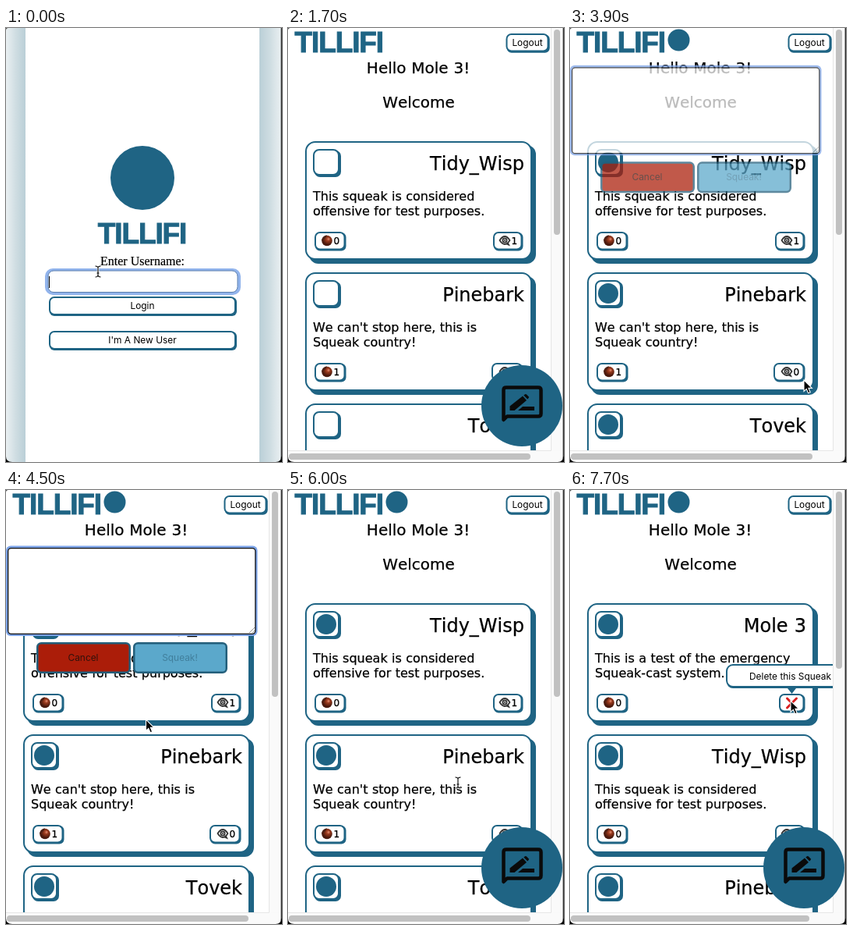
These frames come from a looping animation (354x556 px, 8000 ms). An HTML page:

```html
<!DOCTYPE html>
<html lang="en">
<head>
<meta charset="utf-8">
<title>Tillifi</title>
<style>
  html, body { margin: 0; width: 100%; height: 100%; overflow: hidden; background: #fff; }
  svg { display: block; width: 354px; height: 556px; }
  text { white-space: pre; }
  .ui { font: 11.9px Inter, sans-serif; }
  .page { font-family: "DejaVu Sans", sans-serif; font-kerning: none; word-spacing: .02em;
          stroke: #000; stroke-width: .25px; }
  .serif { font: 16px "Liberation Serif", serif; stroke: #000; stroke-width: .2px; }
  .brand { font: bold 37px "Liberation Sans", sans-serif; letter-spacing: -1.1px;
           fill: #1f6484; stroke: #1f6484; stroke-width: 1px; }
</style>
</head>
<body>
<svg id="stage" viewBox="0 0 354 556">
  <defs>
    <linearGradient id="left"><stop offset="0" stop-color="#eaf0f2"/><stop offset=".5" stop-color="#cfdde2"/><stop offset="1" stop-color="#bacfd7"/></linearGradient>
    <linearGradient id="right"><stop offset="0" stop-color="#bacfd7"/><stop offset=".5" stop-color="#cfdde2"/><stop offset="1" stop-color="#eaf0f2"/></linearGradient>
    <radialGradient id="shell" cx=".6" cy=".35"><stop offset="0" stop-color="#c05a3c"/><stop offset=".5" stop-color="#8a3218"/><stop offset="1" stop-color="#4a1a0e"/></radialGradient>
  </defs>
  <g id="scene"></g>
</svg>
<script>
const LOOP = 8000, STEP = 100;
const TEAL = '#1f6484';
const USER = 'Mole 3';
const MESSAGE = 'This is a test of the emergency Squeak-cast system.';
const WRAP = 48;
const scene = document.getElementById('scene');

const text = (x, y, str, { cls = 'page', size, anchor = 'start', fill = '#000', id = '' } = {}) =>
  `<text x="${x}" y="${y}" class="${cls}" text-anchor="${anchor}"` +
  `${cls === 'brand' ? '' : ` fill="${fill}"`}${size ? ` font-size="${size}"` : ''}${id ? ` id="${id}"` : ''}>${str}</text>`;

const rect = (x, y, w, h, r, fill, stroke = 'none', sw = 0) =>
  `<rect x="${x + sw / 2}" y="${y + sw / 2}" width="${w - sw}" height="${h - sw}" rx="${r}" fill="${fill}" stroke="${stroke}" stroke-width="${sw}"/>`;

const circle = (x, y, r, fill, stroke = 'none', sw = 0) =>
  `<circle cx="${x}" cy="${y}" r="${r}" fill="${fill}" stroke="${stroke}" stroke-width="${sw}"/>`;

const path = (d, fill, stroke = 'none', sw = 0, extra = '') =>
  `<path d="${d}" fill="${fill}" stroke="${stroke}" stroke-width="${sw}" ${extra}/>`;

const at = (x, y, body, extra = '') => `<g transform="translate(${x} ${y})" ${extra}>${body}</g>`;

// White box with a teal border and a hard shadow to the lower right.
const raised = (x, y, w, h, r, drop) =>
  rect(x + drop, y + drop, w, h, r, TEAL) + rect(x, y, w, h, r, '#fff', TEAL, 2);

// ---------- login ----------
function login(t) {
  const typed = USER.slice(0, [100, 300, 500, 700, 900, 1200].filter(k => t >= k).length);
  return rect(0, 0, 354, 556, 0, '#fff') +
    rect(0, 0, 25, 556, 0, 'url(#left)') + rect(325, 0, 28, 556, 0, 'url(#right)') +
    circle(175, 192, 41, TEAL) +
    text(174.5, 275.5, 'TILLIFI', { cls: 'brand', anchor: 'middle' }) +
    text(175, 304, 'Enter Username:', { cls: 'serif', anchor: 'middle' }) +
    rect(50, 308, 251, 34, 10, '#92b4ec') +
    rect(53.5, 310.5, 244, 28.5, 7, '#fff', '#5b7fae', 1) +
    text(55, 330, typed, { cls: 'ui', id: 'typed' }) +
    `<rect id="caret" x="55" y="318" width="1" height="15"/>` +
    raised(55, 344, 240, 24, 6, 1) + text(175, 360, 'Login', { cls: 'ui', anchor: 'middle' }) +
    raised(55, 388, 240, 24, 6, 1) + text(175, 404, "I'm A New User", { cls: 'ui', anchor: 'middle' });
}

// ---------- feed ----------
const nut = (x, y) => at(x, y,
  circle(0, 0, 6.8, 'url(#shell)') +
  path('M-7 0C-6-5-3-7 0-7C-1-4-4-1-7 0Z', '#4d2015') + circle(2, -2, 1.4, '#d0775a'));

const eye = (x, y) => at(x, y,
  path('M1 4.5L7 7L4.5 2Z', '#333') +
  path('M-6.5-.5Q0-10.5 6.5-.5Q0 9.5-6.5-.5Z', '#fff', '#333', 1.8, 'stroke-linejoin="round"') +
  circle(0, -.5, 2.6, '#fff', '#333', 1.8) + circle(0, -.5, 1, '#333'));

const cross = (x, y) => at(x, y,
  path('M-6-6L6 6M6-6L-6 6', 'none', '#d81e1e', 3, 'stroke-linecap="round"'));

function card(y, { name, lines, nuts, views }, icons) {
  const own = views === undefined;
  const left = own ? 268 : views ? 263 : 261;
  return at(0, y,
    raised(22, -1, 291, 152, 12, 5) +
    raised(32, 9, 34, 34, 7, 2) + (icons ? circle(49, 26, 13, TEAL) : '') +
    text(303, 36, name, { size: 24, anchor: 'end' }) +
    lines.map((l, i) => text(32, 75 + 19 * i, l, { size: 16 })).join('') +
    raised(34, 115, 39.5, 23.5, 6, 1) + nut(50, 126.5) + text(58.5, 131, nuts, { size: 12 }) +
    raised(left, 115, 300.5 - left, 23.5, 6, 1) +
    (own ? cross(284.5, 127) : eye(278, 126.5) + text(286.5, 131, views, { size: 12 })));
}

const posts = [
  { name: USER, lines: ['This is a test of the emergency', 'Squeak-cast system.'], nuts: 0 },
  { name: 'Tidy_Wisp', lines: ['This squeak is considered', 'offensive for test purposes.'], nuts: 0, views: 1 },
  { name: 'Pinebark', lines: ["We can't stop here, this is", 'Squeak country!'], nuts: 1, views: 0 },
  { name: 'Tovek', lines: [], nuts: 0, views: 0 },
];

const tooltip = () =>
  path('M279 254H290L284.5 261Z', TEAL) +
  raised(200, 223, 170, 30, 8, 1) +
  text(230, 243, 'Delete this Squeak', { cls: 'ui' });

const scrollbars = posted =>
  rect(337.5, 0, 15.5, 556, 0, '#fafafa') + rect(0, 541.5, 353, 14.5, 0, '#fafafa') +
  path('M337.5 0V541.5M0 541.5H337.5', 'none', '#e6e6e6', 1) +
  rect(341, 2, 8, posted ? 227 : 263, 4, '#c1c1c1') +
  rect(1, 545, posted ? 306 : 310, 8, 4, '#c1c1c1');

const composeButton = () =>
  circle(300, 484, 52, TEAL) +
  path('M276.5 502V463.5Q276.5 460.5 280 460.5H321Q324.5 460.5 324.5 464V494Q324.5 497.5 321 497.5H281Z',
    'none', '#0a0a0a', 4.5, 'stroke-linejoin="round"') +
  path('M284.5 490V484.5L301 471.5L306 477L290.5 490Z', '#0a0a0a') +
  path('M302.3 470.5L304 469.2Q305 468.6 306 469.4L308.6 472.2Q309.4 473.2 308.6 474L307.2 475.4Z', '#0a0a0a') +
  path('M295 490L301 485H316V490Z', '#0a0a0a');

// ---------- composer ----------
function composer(t) {
  const p = Math.min(1, (t - 3800) / 300);
  const lift = -80 * (1 - p) ** 3;
  const count = Math.max(0, Math.min(MESSAGE.length, Math.round((t - 4600) / 700 * MESSAGE.length)));
  const typed = MESSAGE.slice(0, count);
  const button = (x, fill, label, ink) =>
    rect(x, 195, 121, 40, 5, fill, '#245f7b', 2.5) +
    text(x + 60, 219, label, { cls: 'ui', anchor: 'middle', fill: ink });
  return at(0, lift,
    rect(0, 71.5, 322.5, 115.5, 6, '#7ba2e6') +
    rect(2, 74, 318.5, 111, 4, '#fff', '#111', 1.3) +
    path('M312 183L319 176M316 183L319 180', 'none', '#777', .8) +
    text(22, 99, typed.slice(0, WRAP), { cls: 'ui' }) +
    text(22, 114, typed.slice(WRAP), { cls: 'ui' }) +
    button(39, '#ab1d09', 'Cancel', '#32120c') +
    button(163, '#5ba8cb', 'Squeak!', count ? '#12272f' : '#417f9c'),
    `opacity="${Math.min(1, .4 + p)}"`);
}

function feed(t) {
  const icons = t >= 1800, posted = t >= 6200;
  const composing = t >= 3900 && t < 5600;
  return rect(0, 0, 354, 556, 0, '#fff') +
    text(8.5, 30.7, 'TILLIFI', { cls: 'brand' }) + (icons ? circle(139.5, 15.5, 14, TEAL) : '') +
    raised(279.5, 7, 55, 23.5, 6, 1.2) + text(307, 23, 'Logout', { cls: 'ui', anchor: 'middle' }) +
    text(167, 58, `Hello ${USER}!`, { size: 20, anchor: 'middle' }) +
    text(167.5, 102, 'Welcome', { size: 20, anchor: 'middle' }) +
    posts.slice(posted ? 0 : 1).slice(0, 3).map((p, i) => card(146 + 168 * i, p, icons)).join('') +
    (t >= 7500 ? tooltip() : '') +
    scrollbars(posted) +
    (t >= 3800 && t < 5600 ? '' : composeButton()) +
    (composing ? composer(t) : '');
}

// ---------- pointer ----------
const BEAM = 'M-3.5-7Q0-7 0-4.5Q0-7 3.5-7M0-5V5M-3.5 7Q0 7 0 4.5Q0 7 3.5 7M-1.5 2H1.5';
const shapes = {
  arrow: path('M0 0V14.5L3.3 11.4L5.6 16.8L8.2 15.7L5.9 10.4H10.4Z', '#000', '#fff', 1.1),
  beam: path(BEAM, 'none', '#fff', 2.6) + path(BEAM, 'none', '#000', 1.1),
  hand: path('M-1.6 1Q-1.6-1 0-1Q1.5-1 1.5 1V6Q3.8 4.6 4.4 6.5Q6.4 5.3 7 7.2Q9.3 6.4 9.3 9Q9.3 13 7.6 15V17H0V15Q-3 12-5 9.5Q-5.8 7.5-4 7.3Q-2.6 7.6-1.6 9Z', '#fff', '#000', 1.1) +
    path('M2 11V14.5M4.2 11V14.5M6.4 11V14.5', 'none', '#000', .8),
};

// time, x, y
const route = [
  [2400, 116, 311], [2600, 118, 312], [2900, 118, 312], [3100, 150, 285], [3300, 235, 360],
  [3500, 296, 443], [3700, 300, 451], [4000, 300, 451], [4500, 179.5, 294], [4800, 179.5, 294],
  [5300, 231, 224], [5700, 231, 224], [5800, 229, 290], [5900, 222, 350], [6000, 218, 375],
  [6300, 218, 375], [6700, 182, 338], [7200, 225, 296], [7500, 283, 270], [8000, 283, 270],
];

function place(t) {
  const i = route.findIndex(k => k[0] > t);
  const [a, b] = [route[i - 1], route[i]];
  const p = (t - a[0]) / (b[0] - a[0]);
  return [a[1] + (b[1] - a[1]) * p, a[2] + (b[2] - a[2]) * p];
}

function pointer(t) {
  if (t < 100) return at(118, 312, shapes.beam);
  if (t < 2400) return '';
  const [x, y] = place(t);
  const within = (a, b) => t >= a && t < b;
  const shape = within(3500, 3900) || within(5200, 5700) ? 'hand'
    : within(5900, 6500) ? 'beam' : 'arrow';
  const click = within(3700, 3900) || within(5400, 5600);
  return (click ? circle(x, y - 1.5, 29, 'none', '#fff', 5) + circle(x, y - 1.5, 29, 'none', '#0a0a0a', 2.8) : '') +
    at(x, y, shapes[shape]);
}

const edges = path('M352.6 0H354V556H352.6Z', '#2b2b2b') +
  path('M0 549Q0 556 8 556H0Z', '#000') + path('M353 549Q353 556 346 556H354V549Z', '#000') +
  path('M0 0H3Q0 0 0 3Z', '#333');

let shown = -1;
function tick(now) {
  const t = Math.floor(now % LOOP / STEP) * STEP;
  if (t !== shown) {
    shown = t;
    scene.innerHTML = (t < 1700 ? login(t) : feed(t)) + pointer(t) + edges;
    const typed = document.getElementById('typed');
    if (typed && typed.textContent) {
      document.getElementById('caret').setAttribute('x', 55 + Math.round(typed.getComputedTextLength()));
    }
  }
  requestAnimationFrame(tick);
}
tick(performance.now());
</script>
</body>
</html>
```
